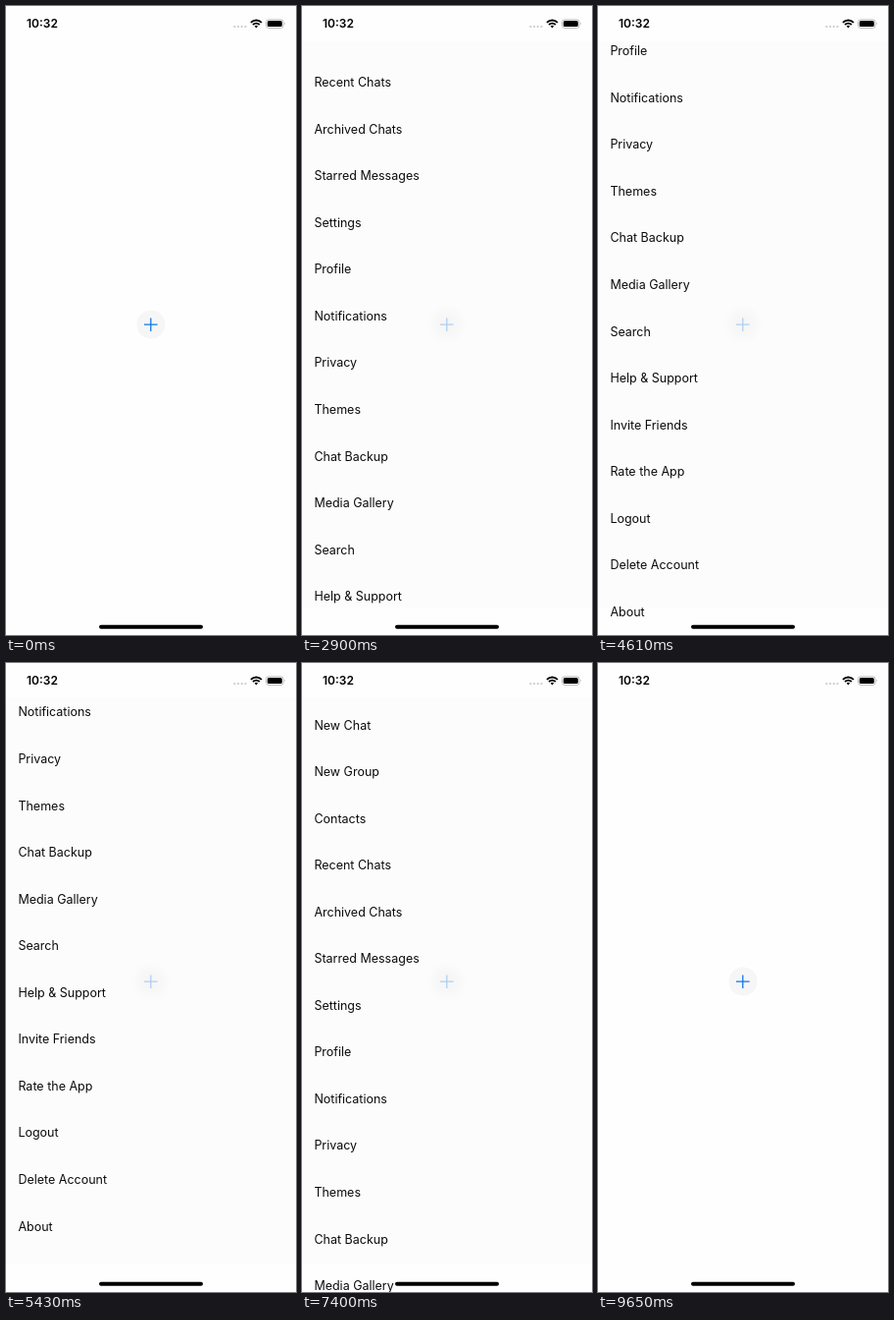
An HTML page for the animation above (9850 ms loop, 296x640 px).

```html
<!DOCTYPE html>
<html lang="en">
<head>
<meta charset="utf-8">
<style>
  html, body { margin: 0; height: 100%; overflow: hidden; background: #fff; }
  svg { display: block; width: 296px; height: 640px; }
  text { font-family: Inter, "Liberation Sans", sans-serif; font-size: 12.5px; fill: #0c0c0c; }
  .clock { font-size: 12px; font-weight: 600; fill: #000; }
</style>
</head>
<body>
<svg viewBox="0 0 296 640">
  <defs>
    <clipPath id="page"><rect y="36" width="296" height="604"/></clipPath>
    <filter id="soft" x="-1" y="-1" width="3" height="3"><feGaussianBlur id="blur" stdDeviation="0"/></filter>
  </defs>
  <rect width="296" height="640" fill="#fefefe"/>
  <rect id="veil" y="36" width="296" height="576" fill="#fcfcfc"/>
  <circle cx="148" cy="324" r="14.5" fill="#f6f6f7" filter="url(#soft)"/>
  <path id="plus" d="M141 324.2h13.6M147.8 317.4v13.6" stroke="#0f78e6" stroke-width="1.3"/>
  <g clip-path="url(#page)"><g id="list"></g></g>

  <text class="clock" x="21" y="22.4">10:32</text>
  <g fill="#c9c9cb">
    <circle cx="233.3" cy="21" r="1.1"/><circle cx="237" cy="21" r="1.1"/>
    <circle cx="240.7" cy="21" r="1.1"/><circle cx="244.4" cy="21" r="1.1"/>
  </g>
  <g fill="none" stroke="#000" stroke-width="1.9">
    <path d="M249.9 16.8a7.8 7.8 0 0 1 11 0M252 19a4.8 4.8 0 0 1 6.8 0"/>
    <path d="M255.4 22.4l-1.7-1.8a2.5 2.5 0 0 1 3.4 0z" fill="#000" stroke="none"/>
  </g>
  <rect x="265.5" y="13.8" width="17.6" height="8.6" rx="2.7" fill="none" stroke="#a9a9ab" stroke-width=".8"/>
  <rect x="266.8" y="15.1" width="15" height="6" rx="1.6"/>
  <path d="M284 16.6q1.3 1.5 0 3z" fill="#a9a9ab"/>
  <rect x="95" y="629.8" width="106" height="4" rx="2"/>
</svg>
<script>
const LOOP = 9850, PITCH = 47.55, HIDDEN = 700, HOME = 399.5;
const $ = id => document.getElementById(id);

const items = ["New Chat", "New Group", "Contacts", "Recent Chats", "Archived Chats",
  "Starred Messages", "Settings", "Profile", "Notifications", "Privacy", "Themes",
  "Chat Backup", "Media Gallery", "Search", "Help & Support", "Invite Friends",
  "Rate the App", "Logout", "Delete Account", "About"];

items.forEach((label, i) => {
  const row = document.createElementNS("http://www.w3.org/2000/svg", "text");
  row.setAttribute("x", 12.4);
  row.setAttribute("y", i * PITCH + 4.5);
  row.textContent = label;
  $("list").append(row);
});

const linear = x => x;
const out = x => 1 - (1 - x) ** 2;
const spring = x => 1 - (1 - x) ** 3;
const inOut = x => x * x * (3 - 2 * x);

// Each move: first step (ms), last step (ms), number of steps, end value, easing
const scroll = [
  [750, 1350, 6, HOME, spring],
  [2330, 2660, 4, -57, out],
  [2800, 3000, 3, -66, out],
  [3190, 3300, 2, -84.5, linear],
  [3920, 3920, 1, -86, linear],
  [4040, 4810, 8, -300.5, out],
  [4910, 5140, 3, -306, out],
  [5320, 5430, 2, -330.4, linear],
  [5550, 5870, 4, -306, out],
  [6050, 6380, 4, 126, linear],
  [6480, 7010, 6, 63.5, out],
  [7400, 7400, 1, 63, linear],
  [7510, 8170, 7, HOME, inOut],
  [9210, 9650, 5, HIDDEN, spring]
];
const opening = [
  [750, 1350, 6, 1, spring],
  [9210, 9650, 5, 0, spring]
];

function valueAt(moves, value, t) {
  for (const [first, last, steps, to, ease] of moves) {
    if (t < first) break;
    const pace = (last - first) / (steps - 1) || 1;
    const step = Math.min(steps, Math.floor((t - first) / pace + 1e-6) + 1);
    value += (to - value) * ease(step / steps);
  }
  return value;
}

function draw(now) {
  const t = now % LOOP;
  const open = valueAt(opening, 0, t);
  $("list").setAttribute("transform", `translate(0 ${valueAt(scroll, HIDDEN, t)})`);
  $("veil").setAttribute("opacity", open);
  $("plus").setAttribute("opacity", 1 - 0.7 * open);
  $("blur").setAttribute("stdDeviation", 0.3 + 4 * open);
  requestAnimationFrame(draw);
}
requestAnimationFrame(draw);
</script>
</body>
</html>
```
